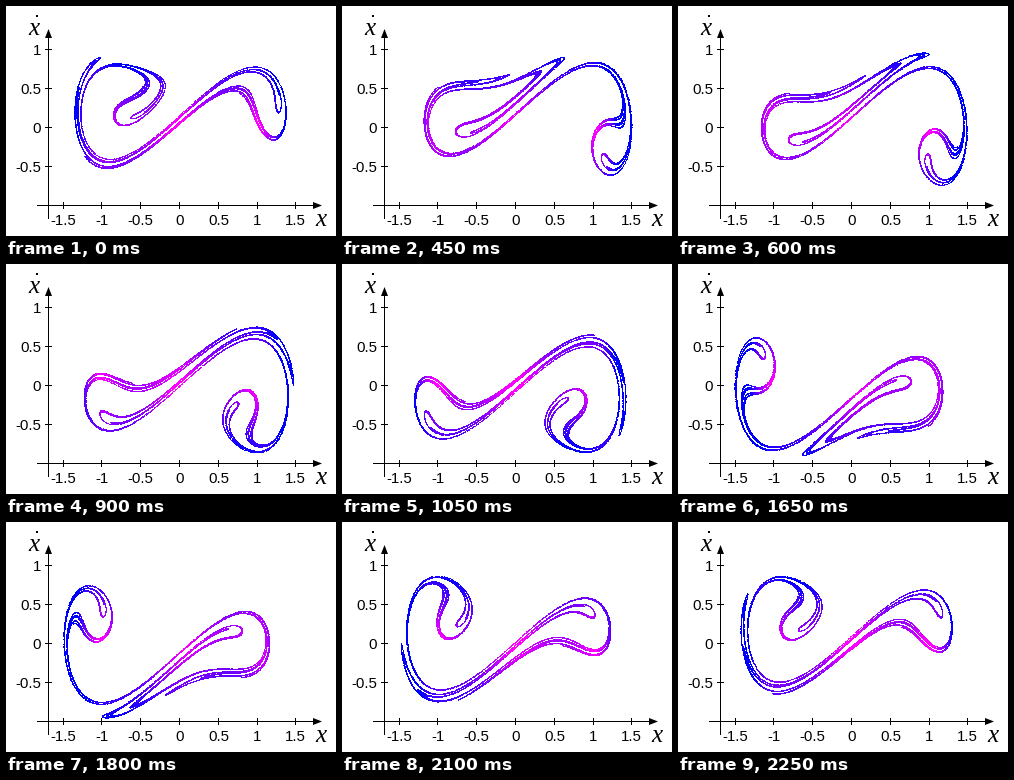
Write a matplotlib script that moves like this. It is 330 by 230 pixels and loops after 2400 ms.

```python
import numpy as np
import matplotlib.pyplot as plt
from matplotlib.animation import FuncAnimation

W, H, DPI = 330, 230, 80
PX = 72 / DPI                      # one pixel in points
X0, Y0, UNIT = 173, 121, 77.6      # pixel of the phase-space zero, pixels per unit
AXIS_X, AXIS_Y = 42, 199
FRAMES, INTERVAL = 16, 150
DAMPING, FORCE = 0.2, 0.3
POINTS, SETTLE, SUBSTEPS = 40000, 8, 4


def drift(x, v):
    return x - x * x * x - DAMPING * v


def accel(x, v, t):
    return drift(x, v) + FORCE * np.cos(t)


def rk4(x, v, t, h):
    a1 = accel(x, v, t)
    v2 = v + h / 2 * a1
    a2 = accel(x + h / 2 * v, v2, t + h / 2)
    v3 = v + h / 2 * a2
    a3 = accel(x + h / 2 * v2, v3, t + h / 2)
    v4 = v + h * a3
    a4 = accel(x + h * v3, v4, t + h)
    return (x + h / 6 * (v + 2 * v2 + 2 * v3 + v4),
            v + h / 6 * (a1 + 2 * a2 + 2 * a3 + a4))


def sections():
    """Points of the forced Duffing attractor at evenly spaced drive phases."""
    rng = np.random.default_rng(4)
    x = rng.uniform(-0.25, -0.05, POINTS)
    v = rng.uniform(-0.1, 0.1, POINTS)
    step = 2 * np.pi / FRAMES
    h = step / SUBSTEPS
    found = []
    for n in range((SETTLE + 1) * FRAMES):
        if n >= SETTLE * FRAMES:
            found.append((x, v))
        t = (n % FRAMES) * step
        for s in range(SUBSTEPS):
            x, v = rk4(x, v, t + s * h, h)
    return found


def paint(x, v):
    """Single-pixel dots, magenta where the unforced flow is slow, blue where fast."""
    speed = np.hypot(v, drift(x, v))
    col = np.rint(X0 + UNIT * x).astype(int)
    row = np.rint(Y0 - UNIT * v).astype(int)
    img = np.zeros((H, W, 4), np.uint8)
    img[row, col, 0] = 255 * np.clip(1.1 - 1.15 * speed, 0, 1)
    img[row, col, 2:] = 255
    return img


def bar(x, y, w, h):
    ax.fill([x, x + w, x + w, x], [y, y, y + h, y + h],
            color="black", lw=0, snap=False)


def label(x, y, s, size=15, **style):
    style = {"family": "Liberation Sans", "ha": "center", **style}
    ax.text(x, y, s, fontsize=size * PX, va="baseline", color="black", **style)


def draw_axes():
    bar(31, AXIS_Y, 278, 1)
    bar(AXIS_X, 30, 1, 183)
    cx, cy = AXIS_X + 0.5, AXIS_Y + 0.5
    ax.fill([316, 307, 307], [cy, cy - 3.5, cy + 3.5], color="black", lw=0)
    ax.fill([cx, cx - 3.5, cx + 3.5], [23, 32, 32], color="black", lw=0)

    for value in np.arange(-1.5, 1.6, 0.5):
        px = round(X0 + UNIT * value)
        bar(px, AXIS_Y - 3, 1, 7)
        label(px + 0.5, 219, f"{value:g}")
    for value in np.arange(-0.5, 1.1, 0.5):
        py = round(Y0 - UNIT * value)
        bar(AXIS_X - 3, py, 7, 1)
        label(35, py + 6, f"{value:g}", ha="right")

    serif = {"family": "Liberation Serif", "style": "italic"}
    label(315, 220, "x", 25, **serif)
    label(28, 29, "x", 25, **serif)
    bar(30, 9, 2, 2)


fig = plt.figure(figsize=(W / DPI, H / DPI), dpi=DPI, facecolor="white")
ax = fig.add_axes([0, 0, 1, 1])
ax.set_xlim(0, W)
ax.set_ylim(H, 0)
ax.axis("off")
draw_axes()

pictures = [paint(*section) for section in sections()]
cloud = fig.figimage(pictures[0], origin="upper")


def update(n):
    cloud.set_data(pictures[n % FRAMES])
    return cloud,


anim = FuncAnimation(fig, update, frames=FRAMES, interval=INTERVAL,
                     repeat=True, repeat_delay=0, blit=False)
plt.show()
```
